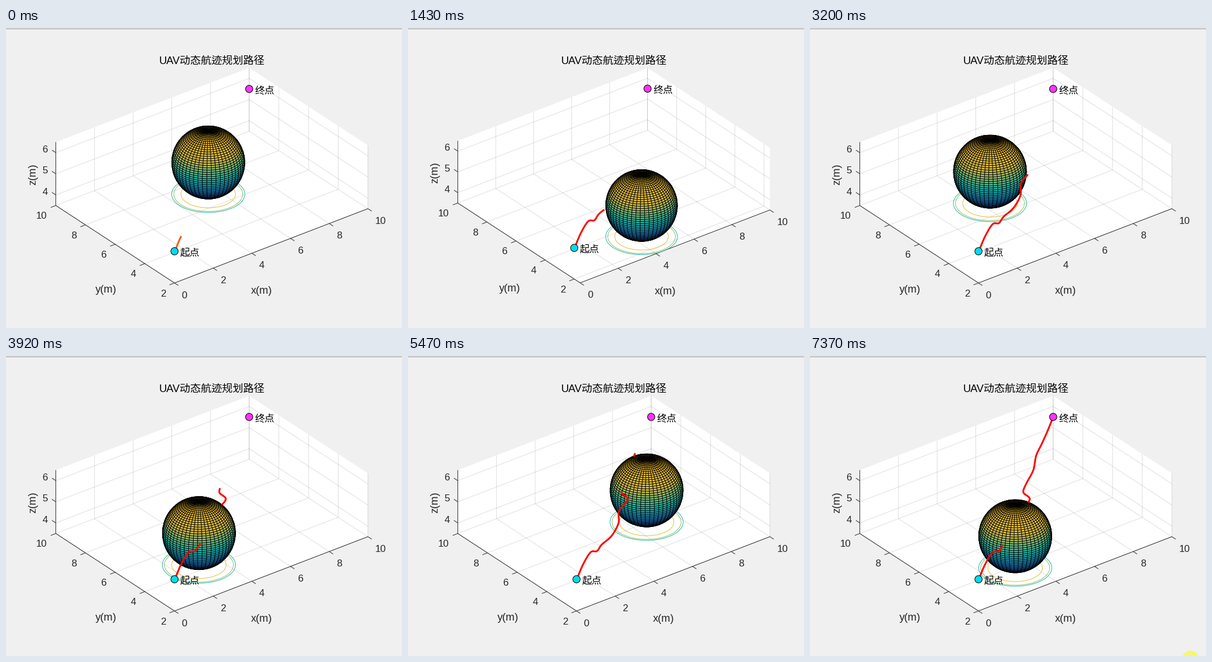
Write a matplotlib script that moves like this. It is 682 by 516 pixels and loops after 7450 ms.

```python
import numpy as np
import matplotlib.pyplot as plt
from matplotlib.animation import FuncAnimation
from matplotlib.collections import LineCollection, PolyCollection
from matplotlib.colors import LinearSegmentedColormap
from matplotlib.patches import Circle, Polygon

W, H, DPI = 682, 516, 100
FRAMES, INTERVAL = 149, 50
STEP_MS, LEAD_MS = 80.1, 55        # the simulation advances in coarser steps
LAST_STEP, POINTER_STEP = 88, 92
PX = 72 / DPI                      # points per pixel
DARK = "#262626"

plt.rcParams["font.family"] = ["Liberation Sans", "Noto Sans CJK JP"]

# Orthographic camera: azimuth -37.5, elevation 30
AZ = np.radians(37.5)
CA, SA, CE = np.cos(AZ), np.sin(AZ), np.cos(np.radians(30))
CAM = np.array([[CA, -SA, 0], [-SA / 2, -CA / 2, -CE]])
VIEW = np.array([-SA * CE, -CA * CE, 0.5])
ZMIN, ZMAX = 3.5, 6.5
START, GOAL = (0, 2, 5), (10, 10, 5.5)

RADIUS, ORBIT, MESH = 1.5, 2.0, 50
DEPTH_BIAS = 0.37
CMAP = LinearSegmentedColormap.from_list(
    "height", ["#332b99", "#1a7dd6", "#21baa8", "#d6ba47", "#ffc72e"])

# Key bends of the route on the screen at the default zoom
BENDS = np.array([
    (290, 384), (301, 358), (314, 337), (325, 335), (333, 324), (350, 309),
    (362, 287), (363, 266), (378, 246), (367, 234), (372, 219), (384, 196),
    (389, 171), (398, 152), (408, 130), (418, 105)], float)
FIRST_LEG = 28                     # pixels of route shown at the start


class Stage:
    """Projection that keeps the whole box fitted to the axes area."""

    def __init__(self, ymin):
        self.ymin = ymin
        self.scale = 537.5 / (10 * CA + (10 - ymin) * SA)
        self.mid = np.array([5, (10 + ymin) / 2, 5])

    def __call__(self, x, y, z):
        p = np.array([x, y, z], float) - self.mid
        return np.array([354, 253]) + self.scale * (CAM @ p)


def smooth(pts, n):
    """Catmull-Rom curve with n samples per span."""
    p = np.vstack([2 * pts[0] - pts[1], pts, 2 * pts[-1] - pts[-2]])
    t = np.arange(n)[:, None] / n
    out = []
    for a, b, c, d in zip(p, p[1:], p[2:], p[3:]):
        out.append(.5 * (2 * b + (c - a) * t + (2 * a - 5 * b + 4 * c - d) * t**2
                         + (3 * b - a - 3 * c + d) * t**3))
    return np.vstack(out + [pts[-1:]])


def lift_route():
    """3D points climbing from start to goal, and their length so far."""
    flat = smooth(BENDS, 28)
    length = np.r_[0, np.cumsum(np.hypot(*np.diff(flat, axis=0).T))]
    base = Stage(2)
    z = np.linspace(START[2], GOAL[2], len(flat))
    q = (flat - base(*START)) / base.scale
    q[:, 1] += CE * (z - START[2])
    xy = q @ np.linalg.inv(CAM[:, :2]).T + START[:2]
    return np.column_stack([xy, z]), length


def sphere_faces():
    lat = np.linspace(-np.pi / 2, np.pi / 2, MESH + 1)
    lon = np.linspace(-np.pi, np.pi, MESH + 1)
    la, lo = np.meshgrid(lat, lon, indexing="ij")
    v = np.stack([np.cos(la) * np.cos(lo), np.cos(la) * np.sin(lo), np.sin(la)], -1)
    quads = np.stack([v[:-1, :-1], v[:-1, 1:], v[1:, 1:], v[1:, :-1]], 2)
    front = quads.mean(2) @ VIEW > 0
    height = (quads[:, :, 0, 2] + 1) / 2
    return RADIUS * quads[front] @ CAM.T, CMAP(height[front])


ROUTE, LENGTH = lift_route()
FACES, FACE_COLORS = sphere_faces()
turn = np.linspace(0, 2 * np.pi, 121)
RING = np.column_stack([np.cos(turn), np.sin(turn), 0 * turn]) @ CAM.T
LEVELS = np.arange(5, 6.5, .5)
RING_R = np.sqrt(RADIUS**2 - (LEVELS - 5)**2)

fig = plt.figure(figsize=(W / DPI, H / DPI), dpi=DPI, facecolor="#f0f0f0")
ax = fig.add_axes([0, 0, 1, 1])
ax.set_xlim(-.5, W - .5)
ax.set_ylim(H - .5, -.5)
ax.axis("off")


def label(s, size=17, color=DARK, **kw):
    return ax.text(0, 0, s, fontsize=size * PX, color=color, va="baseline",
                   zorder=9, **kw)


def lines(color, width, z):
    return ax.add_collection(LineCollection([], colors=color, linewidths=width * PX,
                                            zorder=z))


def dot(color):
    return ax.add_patch(Circle((0, 0), 6.3, facecolor=color, edgecolor="black",
                               linewidth=1 * PX, zorder=8))


ax.plot([-1, W], [0, 0], color="#969696", lw=1 * PX)
walls = ax.add_patch(Polygon(np.zeros((6, 2)), facecolor="white", edgecolor="none",
                             zorder=1))
grid = lines((.15, .15, .15, .16), .9, 2)
frame_lines = lines(DARK, .95, 3)
rings = lines(CMAP((LEVELS - ZMIN) / (ZMAX - ZMIN)), 1, 4)
ball = ax.add_collection(PolyCollection([], facecolors=FACE_COLORS,
                                        edgecolors="black", linewidths=.85 * PX,
                                        zorder=5))
trail, = ax.plot([], [], lw=3 * PX, solid_joinstyle="round", zorder=7)
start_dot, goal_dot = dot("#00dcea"), dot("#fb34fb")

XT, YT, ZT = range(0, 11, 2), range(2, 11, 2), range(4, 7)
x_text = [label(str(v), ha="left") for v in XT]
y_text = [label(str(v), ha="right") for v in YT]
z_text = [label(str(v), ha="right") for v in ZT]
x_name = label("x(m)", 18.3, ha="center")
y_name = label("y(m)", 18.3, ha="center")
z_name = label("z(m)", 18.3, ha="center", rotation=90, rotation_mode="anchor")
start_text = label("起点", color="black")
goal_text = label("终点", color="black")
label("UAV动态航迹规划路径", 18.3, "black", ha="center").set_position((354, 62))
pointer = ax.add_patch(Circle((655, 521), 14, color="#f8f76c", zorder=10))


def draw_box(st):
    y0 = st.ymin
    walls.set_xy([st(0, y0, ZMIN), st(0, 10, ZMIN), st(0, 10, ZMAX),
                  st(10, 10, ZMAX), st(10, y0, ZMAX), st(10, y0, ZMIN)])
    g = [[st(x, y0, ZMIN), st(x, 10, ZMIN), st(x, 10, ZMAX)] for x in XT]
    g += [[st(0, y, ZMIN), st(10, y, ZMIN), st(10, y, ZMAX)] for y in YT]
    g += [[st(0, 10, z), st(10, 10, z), st(10, y0, z)] for z in ZT]
    grid.set_segments(g)

    d = .26
    f = [[st(10, y0, ZMIN), st(0, y0, ZMIN), st(0, 10, ZMIN), st(0, 10, ZMAX)]]
    f += [[st(x, y0, ZMIN), st(x, y0 - d, ZMIN)] for x in XT]
    f += [[st(0, y, ZMIN), st(-d, y, ZMIN)] for y in YT]
    f += [[st(0, 10, z), st(0, 10 + d, z)] for z in ZT]
    frame_lines.set_segments(f)

    for t, x in zip(x_text, XT):
        t.set_position(st(x, y0, ZMIN) + (12.5, 26))
    for t, y in zip(y_text, YT):
        t.set_position(st(0, y, ZMIN) + (-15, 23))
    for t, z in zip(z_text, ZT):
        t.set_position(st(0, 10, z) + (-14, -.5))
    x_name.set_position(st(5, y0, ZMIN) + (-17, 82))
    y_name.set_position(st(0, st.mid[1], ZMIN) + (-15.5, 83.5))
    z_name.set_position(st(0, 10, 5) + (-35, 1))

    for point, mark, text in ((START, start_dot, start_text),
                              (GOAL, goal_dot, goal_text)):
        p = st(*point)
        mark.center = tuple(p)
        text.set_position(p + (9.5, 7.5))


def draw_trail(st, step, center):
    """Show the route flown so far at constant speed, hidden behind the ball."""
    flown = FIRST_LEG + (LENGTH[-1] - FIRST_LEG) * step / LAST_STEP
    rel = ROUTE[LENGTH <= flown + 1e-6] - center
    off = rel @ CAM.T
    r2 = (off**2).sum(1)
    surface = np.sqrt(np.maximum(RADIUS**2 - r2, 0))
    hidden = (r2 < RADIUS**2) & (rel @ VIEW < surface - DEPTH_BIAS)
    pts = st(*center) + st.scale * off
    pts[hidden] = np.nan
    trail.set_data(pts[:, 0], pts[:, 1])
    trail.set_color("#f75a20" if step <= 10 else "#ff0000")


def orbit_angle(step):
    """Near-constant turning, a little quicker in the third quarter."""
    return np.radians(np.interp(step, [0, 57, 68, LAST_STEP],
                                [74.7, 636.7, 750.9, 934]))


def update(i):
    tick = int((i * INTERVAL + LEAD_MS) / STEP_MS)
    step = min(tick, LAST_STEP)
    a = orbit_angle(step)
    center = np.array([5 + ORBIT * np.cos(a), 5 + ORBIT * np.sin(a), 5])
    st = Stage(min(2, center[1] - RADIUS))   # box grows to hold the ball
    draw_box(st)
    ball.set_verts(st(*center) + st.scale * FACES)
    floor = st(center[0], center[1], ZMIN)
    rings.set_segments([floor + st.scale * r * RING for r in RING_R])
    draw_trail(st, step, center)
    pointer.set_visible(tick >= POINTER_STEP)
    return []


anim = FuncAnimation(fig, update, frames=FRAMES, interval=INTERVAL,
                     repeat=True, repeat_delay=0, blit=False)
plt.show()
```
